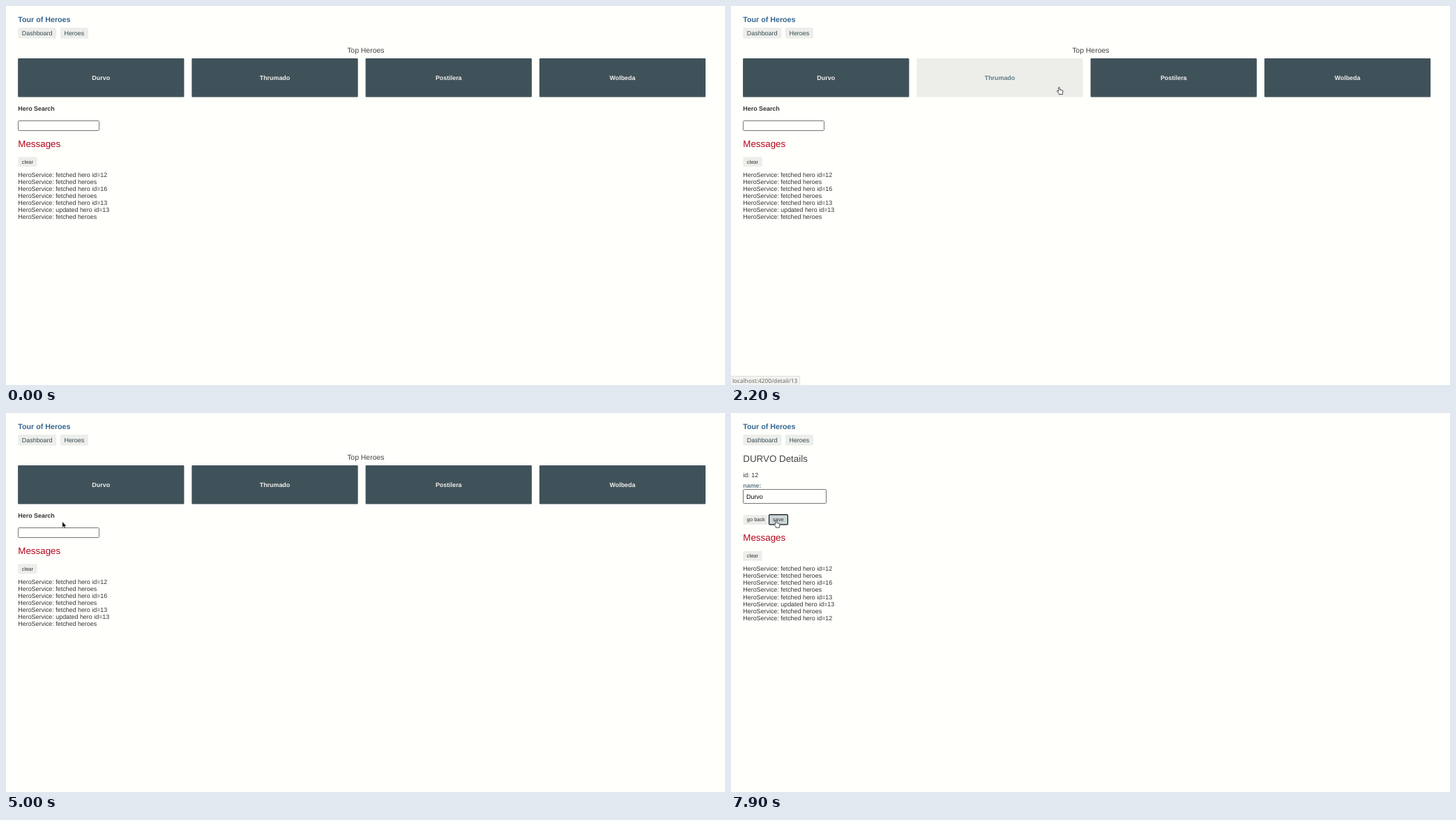
These frames come from a looping animation (1031x543 px, 8000 ms). An HTML page:

```html
<!DOCTYPE html>
<html lang="en">
<head>
<meta charset="utf-8">
<title>Tour of Heroes</title>
<style>
  html, body { margin: 0; width: 100%; height: 100%; overflow: hidden; background: #fffffc; }
  svg { display: block; width: 100%; height: 100%; }
  /* The tiny turn keeps baselines from snapping to whole pixels */
  text { font-family: "Liberation Sans", Arial, sans-serif; text-rendering: geometricPrecision;
    white-space: pre; transform: rotate(.003deg); }
  .status { font-family: "Noto Sans", "Open Sans", sans-serif; }
</style>
</head>
<body>
<svg id="stage" viewBox="0 0 1031 543"></svg>
<script>
const LOOP = 8000, TICK = 50;
const SCALE = .5573; // page pixels to stage pixels
const LEFT = 17.3, ROW = 18 * SCALE, PAD = 10 * SCALE, CARD_STEP = 249.25;
const BODY = 16 * SCALE, SMALL = 13.33 * SCALE, LARGE = 24 * SCALE;
const INK = '#333', SOFT = '#edeeea', HOVER = '#cbd6d8';
const HEROES = ['Durvo', 'Thrumado', 'Postilera', 'Wolbeda'];
const FIRST_ID = 12;
const LOG = ['fetched hero id=12', 'fetched heroes', 'fetched hero id=16', 'fetched heroes',
  'fetched hero id=13', 'updated hero id=13', 'fetched heroes'];
const APPEARS = 600, OPENED = 5350, LOADED = 5800, SAVED = 7900;

// The pointer rests between moves
const START = { x: 44, y: 11 };
const SAVE = { x: 64.5, y: 154 };
const MOVES = [
  { from: 600, to: 900, x: 49, y: 36 },
  { from: 1150, to: 1400, x: 93, y: 42.5 },
  { from: 1550, to: 1750, x: 88, y: 78 },
  { from: 1750, to: 2200, x: 470.5, y: 116.5 },
  { from: 2200, to: 2400, x: 640, y: 114 },
  { from: 2500, to: 2750, x: 822, y: 114 },
  { from: 2750, to: 2900, x: 582, y: 215 },
  { from: 3050, to: 3250, x: 197.7, y: 188.3 },
  { from: 3350, to: 3600, x: 110, y: 172 },
  { from: 3700, to: 4050, x: 142, y: 140 },
  { from: 4050, to: 4550, x: 36, y: 222.3 },
  { from: 4800, to: 5000, x: 80.7, y: 155.5 },
  { from: 5000, to: 5150, x: 93.8, y: 104.7 },
  { from: 6400, to: 6550, x: 88, y: 115 },
  { from: 6650, to: 6850, ...SAVE },
  { from: 6950, to: 7400, x: 47, y: 173 },
  { from: 7400, to: 7800, ...SAVE }
];

const SHAPES = {
  arrow: '<path d="M0 0V8.7L2 6.9 3.5 10.1 5 9.4 3.6 6.4H6Z" fill="#151515" stroke="#fff" stroke-width=".5"/>',
  hand: '<path d="M-1 .4Q0-.6.9.4L1.2 3.6 4.6 4.3Q5.7 4.6 5.5 5.7L4.9 8.2V10.2H-.2V9L-3 5.9Q-3.3 4.6-2 4.8L-.7 6Z" fill="#fff" stroke="#333" stroke-width=".9" stroke-linejoin="round"/>',
  beam: '<path d="M-1.8-4.5H1.8M0-4.5V4.5M-1.8 4.5H1.8" fill="none" stroke="#222" stroke-width=".8"/>'
};

const clamp = v => Math.max(0, Math.min(1, v));

function pointerAt(t) {
  let { x, y } = START;
  for (const m of MOVES) {
    const p = clamp((t - m.from) / (m.to - m.from));
    x += (m.x - x) * p;
    y += (m.y - y) * p;
  }
  return { x, y };
}

// Fades in at the start of a visit and out after its end
const visit = (t, start, end, fade = 200) =>
  Math.min(clamp((t - start) / fade), clamp((end + fade - t) / fade));

const text = (s, x, y, size, fill, extra = '') =>
  `<text x="${x}" y="${y}" font-size="${size}" fill="${fill}" ${extra}>${s}</text>`;
const rect = (x, y, w, h, fill, extra = '') =>
  `<rect x="${x}" y="${y}" width="${w}" height="${h}" rx="1.1" fill="${fill}" ${extra}/>`;
const BOLD = 'font-weight="bold"', CENTER = 'text-anchor="middle"';

function scene(t) {
  const visible = t >= APPEARS;
  const pointer = pointerAt(t);
  let shape = 'arrow';

  function hit(x, y, w, h, kind) {
    const inside = visible && pointer.x >= x && pointer.x <= x + w &&
      pointer.y >= y && pointer.y <= y + h;
    if (inside) shape = kind;
    return inside;
  }
  function link(label, x, w) {
    const over = hit(x, 30.9, w, 15.6, 'hand');
    return rect(x, 30.9, w, 15.6, over ? HOVER : SOFT) +
      text(label, x + PAD, 41.7, BODY, over ? '#039be5' : '#334953');
  }
  function button(label, x, y, w) {
    const over = hit(x, y, w, 14, 'hand');
    return rect(x, y, w, 14, over ? HOVER : SOFT) + text(label, x + PAD, y + 9.5, SMALL, INK);
  }
  function field(x, y, w, h) {
    const over = hit(x, y, w, h, 'beam');
    return rect(x, y, w, h, '#fffffe', `stroke="${over ? '#4f4f4f' : '#767674'}"`);
  }
  function card(name, i) {
    const x = LEFT - .2 + i * CARD_STEP;
    const over = hit(x, 75, 238.3, 55.6, 'hand');
    return rect(x, 75, 238.3, 55.6, over ? SOFT : '#405259') +
      text(name, x + 119.15, 105.7, BODY, over ? '#607d8b' : '#eee', `${BOLD} ${CENTER}`);
  }
  function messages(y, lines) {
    return text('Messages', LEFT, y, LARGE, '#b0051c') + button('clear', LEFT, y + 14.4, 27.3) +
      lines.map((s, i) => text('HeroService: ' + s, LEFT, y + 43 + i * ROW, BODY, INK)).join('');
  }
  function dashboard() {
    return text('Top Heroes', 515.8, 66.7, 18.72 * SCALE, '#444', CENTER) +
      HEROES.map(card).join('') + text('Hero Search', LEFT, 149.9, BODY, INK, BOLD) +
      field(17.5, 164.5, 116, 14) + messages(201.9, LOG);
  }
  function details() {
    const name = HEROES[0];
    let out = text(name.toUpperCase() + ' Details', LEFT, 69.9, LARGE, '#444') +
      text('id: ' + FIRST_ID, LEFT, 92.3, BODY, INK) +
      text('name:', LEFT, 106.6, BODY, '#607d8b', BOLD) +
      field(17.5, 109.5, 119, 20) + text(name, 22, 122.5, BODY, '#000') +
      button('go back', LEFT, 145.9, 37.2) + button('save', 54.5, 145.9, 26.9);
    if (t >= SAVED) out += rect(54.6, 145.6, 26.8, 14.2, 'none', 'stroke="#101418" stroke-width="1.2"');
    return out + messages(183.4, [...LOG, LOG[0]]);
  }
  function status() {
    const opacity = Math.max(visit(t, 1650, 3050), visit(t, 5250, 6050));
    const lastCard = HEROES.length - 1;
    const index = t > 2750 && t < OPENED - 200 ? lastCard : Math.floor((pointer.x - LEFT) / CARD_STEP);
    return `<g opacity="${opacity}">` +
      '<path d="M0 530.4H97Q98.7 530.4 98.7 532V543H0Z" fill="#f3f3ef"/>' +
      '<path d="M0 530.4H97Q98.7 530.4 98.7 532V543" fill="none" stroke="#d8d8d5" stroke-width=".8"/>' +
      text('localhost:4200/detail/' + (FIRST_ID + index), 2, 540, 8.27, '#666', 'class="status"') + '</g>';
  }

  const page = t < OPENED ? dashboard() : t < LOADED ? messages(69.9, LOG) : details();
  return text('Tour of Heroes', LEFT, 22.6, 19.2 * SCALE, '#35658f', BOLD) +
    link('Dashboard', LEFT, 54.9) + link('Heroes', 77.9, 40) + page + status() +
    (visible ? `<g transform="translate(${pointer.x} ${pointer.y})">${SHAPES[shape]}</g>` : '');
}

const stage = document.getElementById('stage');
let shown = -1;
function draw() {
  const t = Math.floor(performance.now() % LOOP / TICK) * TICK;
  if (t !== shown) stage.innerHTML = scene(shown = t);
  requestAnimationFrame(draw);
}
draw();
</script>
</body>
</html>
```
